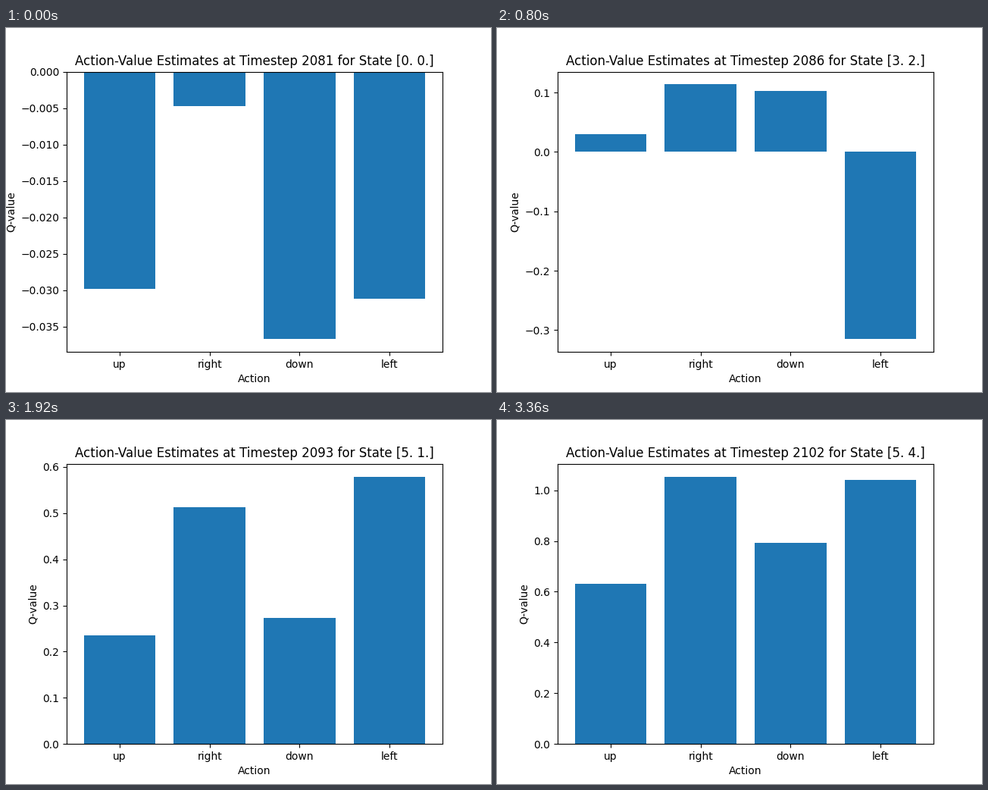
Recreate the animation shown at these times as a matplotlib script. Size 640 by 480 pixels, loop 3.52 s.

```python
import numpy as np
import matplotlib.pyplot as plt
from matplotlib.animation import FuncAnimation

ACTIONS = ["up", "right", "down", "left"]
FIRST_STEP = 2081

# The agent's walk through the grid; "." means it bumped and stayed.
MOVES = "RDRRD..URRDUD.D.UUDDD"
OFFSETS = {"R": (1, 0), "D": (0, 1), "U": (0, -1), ".": (0, 0)}

# Action values at a few walking distances (x + y) from the start.
ROUTE = {
    0: (-0.0298, -0.0047, -0.03667, -0.0312),
    3: (-0.0099, 0.11787, 0.0325, -0.06673),
    4: (0.0546, 0.1950, 0.0632, 0.0686),
    6: (0.2302, 0.5258, 0.2704, 0.5850),
    9: (0.6310, 1.0521, 0.7927, 1.0408),
}
# A cell that lies beside the main route.
DETOUR = {(3, 2): (0.030, 0.1137, 0.1027, -0.3154)}

# Growth of each action value per step since the first visit.
GROWTH = np.array([1.0106, 0.9875, 1.0046, 0.994])


def walk(moves):
    x, y = 0, 0
    path = [(x, y)]
    for move in moves:
        dx, dy = OFFSETS[move]
        x, y = x + dx, y + dy
        path.append((x, y))
    return path


PATH = walk(MOVES)


def base_values(cell):
    if cell in DETOUR:
        return np.array(DETOUR[cell])
    return np.array([np.interp(sum(cell), list(ROUTE), column)
                     for column in zip(*ROUTE.values())])


def action_values(i):
    age = i - PATH.index(PATH[i])
    return base_values(PATH[i]) * GROWTH ** age


fig, ax = plt.subplots(figsize=(6.4, 4.8), dpi=100)


def draw(i):
    state = np.array(PATH[i], dtype=float)
    ax.clear()
    ax.bar(ACTIONS, action_values(i), color="tab:blue")
    ax.set_xlabel("Action")
    ax.set_ylabel("Q-value")
    ax.set_title(f"Action-Value Estimates at Timestep {FIRST_STEP + i} for State {state}")


anim = FuncAnimation(fig, draw, frames=len(PATH), interval=160,
                     repeat=True, repeat_delay=0)
plt.show()
```
